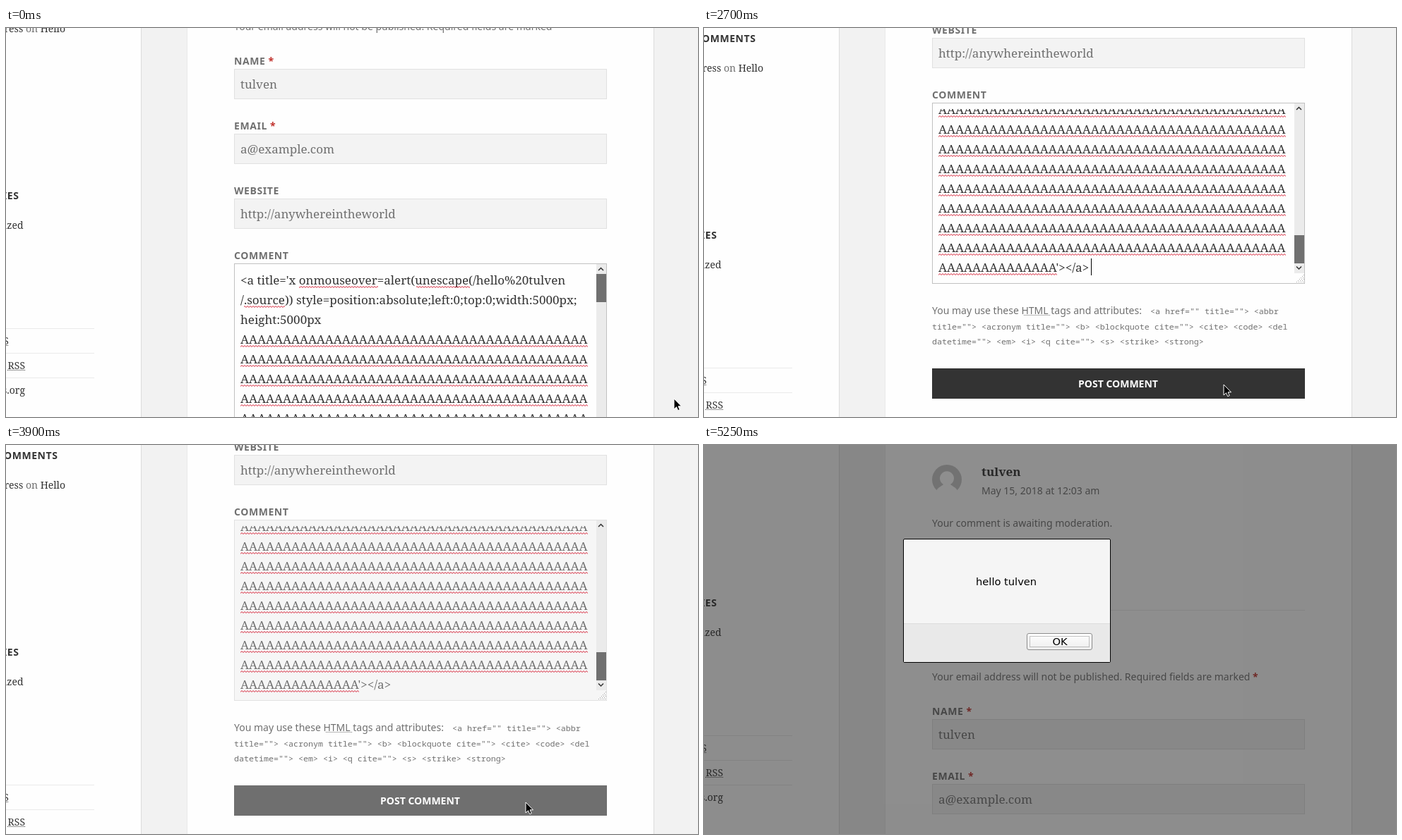
Write an HTML page that moves like this. It is 980 px wide and 552 px high and loops after 6.99 s.

```html
<!DOCTYPE html>
<html lang="en">
<head>
<meta charset="utf-8">
<title>Comment form</title>
<style>
  html, body { margin: 0; width: 100%; height: 100%; overflow: hidden; background: #f2f2f2; }
  svg { display: block; width: 980px; height: 552px; }
  text { white-space: pre; fill: #707070; font: 14px "Noto Sans", sans-serif; }
  .label { font-weight: 700; letter-spacing: .04em; }
  .head { font-weight: 700; letter-spacing: .04em; fill: #333; text-anchor: end; }
  .link { font-family: "Noto Serif", serif; fill: #333; text-anchor: end; }
  .value { font: 17px "Noto Serif", serif; }
  .code { font: 11.667px "Noto Sans Mono", monospace; }
  .star { fill: #c0302b; font-weight: 700; }
  .dim { fill: #707070; }
  .field { fill: #f3f3f3; stroke: #e1e1e1; }
  .rule { stroke: #eaeaea; }
  .dots { stroke: #333; stroke-dasharray: 1 1; }
  .chevron { fill: none; stroke: #333; stroke-width: 1.5; }
  .dialog text { font: 14.667px "DejaVu Sans", sans-serif; fill: #000; }
  #area text { font: 17px "Noto Serif", serif; fill: currentColor; }

  #form, #side, #cursor, #area, #box, #button, #thumb, #top, #end, #caret, #alert {
    animation: 6.99s step-end infinite;
  }
  #form { animation-name: form; }
  #side { animation-name: side; }
  #cursor { animation-name: cursor; }
  #area { animation-name: ink; }
  #box { animation-name: box; }
  #button { animation-name: button; }
  #thumb { animation-name: thumb; }
  #top { animation-name: top; }
  #end { animation-name: end; }
  #caret { animation-name: caret; }
  #alert { animation-name: alert; }

  @keyframes form {
    0% { transform: none; }
    38.626% { transform: translateY(-228px); }
    75.107%, 100% { transform: translateY(331px); }
  }
  @keyframes side {
    0% { transform: none; }
    38.626% { transform: translateY(56px); }
    75.107%, 100% { transform: translateY(-14px); }
  }
  @keyframes cursor {
    0% { transform: translate(945px, 525px); }
    12.875% { transform: translate(941px, 525px); }
    15.021% { transform: translate(914px, 467px); }
    17.167% { transform: translate(909px, 460px); }
    19.17% { transform: translate(913px, 502px); }
    21.316% { transform: translate(919px, 549px); }
    23.462% { transform: translate(919px, 600px); }
    38.626% { transform: translate(735px, 505px); }
    51.502% { transform: translate(735px, 506px); }
    64.377% { transform: translate(797px, 520px); }
    66.523%, 100% { transform: translate(797px, 600px); }
  }
  @keyframes ink { 0% { color: #333; } 55.793%, 100% { color: #707070; } }
  @keyframes box {
    0% { fill: #fefefe; stroke: #c1c1c1; }
    55.793%, 100% { fill: #f6f6f6; stroke: #e1e1e1; }
  }
  @keyframes button { 0% { fill: #333; } 55.793%, 100% { fill: #6f6f6f; } }
  @keyframes thumb { 0% { transform: none; } 38.626%, 100% { transform: translateY(173px); } }
  @keyframes top { 0% { visibility: visible; } 38.626%, 100% { visibility: hidden; } }
  @keyframes end { 0% { visibility: hidden; } 38.626%, 100% { visibility: visible; } }
  @keyframes caret { 0% { opacity: 1; } 47.21%, 100% { opacity: 0; } }
  @keyframes alert { 0% { visibility: hidden; } 75.107%, 100% { visibility: visible; } }
</style>
</head>
<body>
<svg viewBox="0 0 980 552" width="980" height="552">
  <defs>
    <pattern id="wave" width="4" height="28" patternUnits="userSpaceOnUse">
      <path d="M-1 3.5L0 2.5 2 .5 4 2.5 5 3.5" fill="none" stroke="#d4152c"/>
    </pattern>
    <pattern id="waveTop" href="#wave" patternTransform="translate(332 366)"/>
    <pattern id="waveEnd" href="#wave" patternTransform="translate(332 576)"/>
    <clipPath id="inner"><rect x="324" y="343" width="512" height="247"/></clipPath>
    <linearGradient id="face" x2="0" y2="1">
      <stop stop-color="#fff"/><stop offset="1" stop-color="#ededed"/>
    </linearGradient>
  </defs>

  <rect width="980" height="552" fill="#f2f2f2"/>
  <path d="M0 0H191V552H0zM257 0H917V552H257z" fill="#fefefe"/>
  <path d="M191.5 0V552M917.5 0V552" stroke="#dcdcdc"/>
  <path d="M256.5 0V552" stroke="#e9e9e9"/>

  <g id="side">
    <text class="head" x="73.5" y="-36">RECENT COMMENTS</text>
    <text class="link" x="84" y="6">WordPress <tspan class="dim">on</tspan> Hello</text>
    <text class="head" x="18.5" y="243">CATEGORIES</text>
    <text class="link" x="24.5" y="285">Uncategorized</text>
    <path class="rule" d="M0 426.5H125M0 461.5H125M0 496.5H125"/>
    <text class="link" x="4" y="449">Entries RSS</text>
    <text class="link" x="27" y="484">Comments RSS</text>
    <path class="dots" d="M0 450.5H4M2 485.5H27"/>
    <text class="link" x="27" y="519">WordPress.org</text>
  </g>

  <g id="form">
    <circle cx="344" cy="-282" r="21" fill="#c6c6c6"/>
    <path d="M329-266C331-271 337-273 339-275A10 10 0 1 1 349-275C351-273 357-271 359-266A21 21 0 0 1 329-266z" fill="#fefefe"/>
    <text class="value" x="393" y="-287" style="font-weight:700;fill:#333">tulven</text>
    <text x="393" y="-261">May 15, 2018 at 12:03 am</text>
    <text x="323" y="-215">Your comment is awaiting moderation.</text>
    <path class="rule" d="M323-96.5H851"/>

    <text x="323" y="3">Your email address will not be published. Required fields are marked <tspan class="star">*</tspan></text>

    <text class="label" x="323" y="52">NAME <tspan class="star">*</tspan></text>
    <rect class="field" x="323.5" y="58.5" width="527" height="42"/>
    <text class="value" x="332" y="86">tulven</text>

    <text class="label" x="323" y="144">EMAIL <tspan class="star">*</tspan></text>
    <rect class="field" x="323.5" y="150.5" width="527" height="42"/>
    <text class="value" x="332" y="178">a@example.com</text>

    <text class="label" x="323" y="236">WEBSITE</text>
    <rect class="field" x="323.5" y="242.5" width="527" height="42"/>
    <text class="value" x="332" y="270">http://anywhereintheworld</text>

    <text class="label" x="323" y="328">COMMENT</text>
    <g id="area">
      <rect id="box" x="323.5" y="334.5" width="527" height="256"/>
      <g clip-path="url(#inner)">
        <g id="top">
          <text x="332" y="364">&lt;a title='x onmouseover=alert(unescape(/hello%20tulven</text>
          <text x="332" y="392">/.source)) style=position:absolute;left:0;top:0;width:5000px;</text>
          <text x="332" y="420">height:5000px</text>
          <path d="M415 366H527V370H415zM581 366H657V370H581zM337 394H395V398H337z" fill="url(#waveTop)"/>
        </g>
        <g id="end">
          <path id="caret" d="M548.5 555V579" stroke="#000"/>
        </g>
      </g>
      <rect x="836" y="335" width="14" height="241" fill="#ebebeb"/>
      <rect id="thumb" x="836" y="349" width="14" height="40" fill="#707070"/>
      <path class="chevron" d="M839 344L842.5 340.5 846 344M839 566.5L842.5 570 846 566.5"/>
      <path d="M839 589L850 578M842 589L850 581M845 589L850 584M848 589L850 587" stroke="#a8a8a8" stroke-dasharray="1.4 1.4"/>
    </g>

    <text x="323" y="634">You may use these HTML tags and attributes:</text>
    <path class="dots" d="M453 635.5H491" style="stroke:#707070"/>
    <text class="code" x="632" y="634">&lt;a href="" title=""> &lt;abbr</text>
    <text class="code" x="323" y="656">title=""> &lt;acronym title=""> &lt;b> &lt;blockquote cite=""> &lt;cite> &lt;code> &lt;del</text>
    <text class="code" x="323" y="677">datetime=""> &lt;em> &lt;i> &lt;q cite=""> &lt;s> &lt;strike> &lt;strong></text>

    <rect id="button" x="323" y="711" width="528" height="43"/>
    <text x="586.5" y="738" text-anchor="middle" style="font-weight:700;fill:#fff">POST COMMENT</text>
  </g>

  <path id="cursor" d="M1 1v15l3.5-3.3 2.2 5 2.5-1.1-2.2-4.8h4.5z" fill="#000" stroke="#fff"/>

  <g id="alert" class="dialog">
    <rect width="980" height="552" fill="#1e1f1e" fill-opacity=".5"/>
    <rect x="282.5" y="133.5" width="293" height="175" rx="1.5" fill="#f5f5f5" stroke="#000"/>
    <path d="M283 254H575V308H283z" fill="#e9e9e9"/>
    <path d="M283 253.5H575" stroke="#dcdcdc"/>
    <text x="385" y="199">hello tulven</text>
    <rect x="457.5" y="267.5" width="92" height="23" rx="2.5" fill="url(#face)" stroke="#8c8c8c"/>
    <rect x="461.5" y="271.5" width="84" height="15" fill="none" stroke="#888" stroke-dasharray="1 1"/>
    <text x="504" y="284" text-anchor="middle">OK</text>
  </g>
</svg>
<script>
  const NS = "http://www.w3.org/2000/svg";
  const top_ = document.getElementById("top");
  const end = document.getElementById("end");

  function add(parent, tag, attrs, text = "") {
    const el = document.createElementNS(NS, tag);
    for (const key in attrs) el.setAttribute(key, attrs[key]);
    el.textContent = text;
    parent.append(el);
  }

  // One line of padding letters with its spelling mark
  function row(group, y, wave, count = 41, tail = "") {
    add(group, "text", { x: 332, y }, "A".repeat(count) + tail);
    add(group, "rect", { x: 332, y: y + 2, width: count * 12, height: 4, fill: `url(#${wave})` });
  }

  for (let i = 0; i < 5; i++) row(top_, 448 + i * 28, "waveTop");
  for (let i = 8; i > 0; i--) row(end, 574 - i * 28, "waveEnd");
  row(end, 574, "waveEnd", 14, "'></a>");
</script>
</body>
</html>
```
